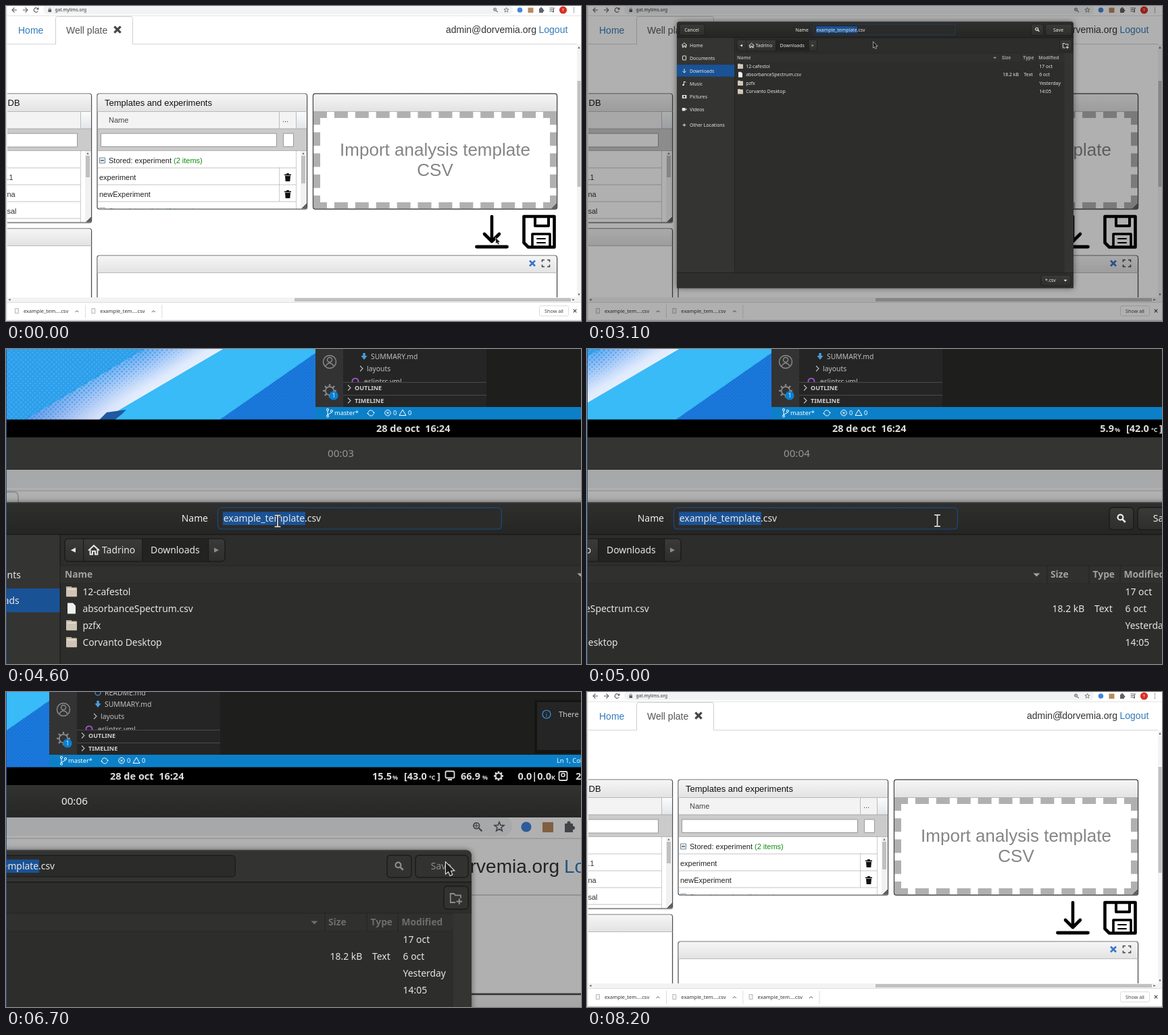
An HTML page with a canvas that plays this animation: 851 px wide and 467 px high, repeating every 8.3 s.

```html
<!DOCTYPE html>
<html lang="en">
<head>
<meta charset="utf-8">
<title>Saving a template</title>
<style>
html, body { margin: 0; width: 100%; height: 100%; overflow: hidden; background: #fff; }
canvas { display: block; }
</style>
</head>
<body>
<canvas id="stage" width="851" height="467"></canvas>
<script>
const ctx = document.getElementById('stage').getContext('2d');
const W = 851, H = 467, LOOP = 8300;
const OPEN = 1200, ZOOM_IN = 3200, BACKDROP = 6600, CLOSE = 6800, SAVED = 7000, ZOOM_OUT = 7700;
const SANS = '"Liberation Sans", Arial, sans-serif', UI = '"Noto Sans", sans-serif';
// time, x, y of the pointer in screen space
const POINTER = [[0, 725, 344], [1000, 725, 344], [1600, 571, 221], [2700, 430, 60], [3900, 405.5, 35],
  [4600, 379.5, 37], [5400, 681, 36.5], [6000, 701, 32.5], [6700, 701, 32.5], [8200, 701, 34], [LOOP, 701, 34]];

function rect(x, y, w, h, color) { ctx.fillStyle = color; ctx.fillRect(x, y, w, h); }
function box(x, y, w, h, r, fill, stroke, lw = 1) {
  ctx.beginPath(); ctx.roundRect(x, y, w, h, r);
  if (fill) { ctx.fillStyle = fill; ctx.fill(); }
  if (stroke) { ctx.strokeStyle = stroke; ctx.lineWidth = lw; ctx.stroke(); }
}
function poly(points, fill) {
  ctx.beginPath(); points.forEach(([x, y]) => ctx.lineTo(x, y));
  ctx.fillStyle = fill; ctx.fill();
}
function line(color, lw, ...points) {
  ctx.beginPath(); points.forEach(([x, y], i) => i ? ctx.lineTo(x, y) : ctx.moveTo(x, y));
  ctx.strokeStyle = color; ctx.lineWidth = lw; ctx.stroke();
}
function dot(x, y, r, fill, stroke, lw = 1) {
  ctx.beginPath(); ctx.arc(x, y, r, 0, 7);
  if (fill) { ctx.fillStyle = fill; ctx.fill(); }
  if (stroke) { ctx.strokeStyle = stroke; ctx.lineWidth = lw; ctx.stroke(); }
}
function text(s, x, y, size, color, font = SANS, align = 'left', weight = '') {
  ctx.font = `${weight} ${size}px ${font}`; ctx.textAlign = align;
  ctx.fillStyle = color; ctx.fillText(s, x, y);
}
function gradient(x0, y0, x1, y1, ...stops) {
  const g = ctx.createLinearGradient(x0, y0, x1, y1);
  stops.forEach((color, i) => g.addColorStop(i / (stops.length - 1), color));
  return g;
}
function shade(y0, y1, a, b) { return gradient(0, y0, 0, y1, a, b); }
function clipped(x, y, w, h, draw) {
  ctx.save(); ctx.beginPath(); ctx.rect(x, y, w, h); ctx.clip(); draw(); ctx.restore();
}
function cross(x, y, r, color, lw) {
  line(color, lw, [x - r, y - r], [x + r, y + r]); line(color, lw, [x - r, y + r], [x + r, y - r]);
}
function caret(x, y, dx, dy, color) {
  poly([[x + dx, y + dy], [x - dx - dy, y - dy - dx], [x - dx + dy, y - dy + dx]], color);
}
function magnifier(x, y, r, color, lw) {
  dot(x - r * .3, y - r * .3, r * .75, null, color, lw);
  line(color, lw * 1.2, [x + r * .3, y + r * .3], [x + r * 1.1, y + r * 1.1]);
}
function gear(x, y, r, color, lw) {
  dot(x, y, r * .62, null, color, lw);
  for (let i = 0; i < 8; i++) {
    const c = Math.cos(i * Math.PI / 4), s = Math.sin(i * Math.PI / 4);
    line(color, lw * 1.3, [x + c * r * .65, y + s * r * .65], [x + c * r, y + s * r]);
  }
}
function house(x, y, color) {
  line(color, 1, [x - 4, y + .3], [x, y - 3.4], [x + 4, y + .3]);
  line(color, 1, [x - 2.7, y - .6], [x - 2.7, y + 3.2], [x - 1, y + 3.2], [x - 1, y + .8],
    [x + 1, y + .8], [x + 1, y + 3.2], [x + 2.7, y + 3.2], [x + 2.7, y - .6]);
}

function pointerAt(t) {
  const i = POINTER.findIndex(k => k[0] > t), [a, b] = [POINTER[i - 1], POINTER[i]];
  const u = (t - a[0]) / (b[0] - a[0]), e = u * u * (3 - 2 * u);
  return [a[1] + (b[1] - a[1]) * e, a[2] + (b[2] - a[2]) * e];
}

function toolbar() {
  rect(0, -1, W, 16, '#fff');
  box(55, -2, 695, 14.5, 7, '#f1f3f4');
  const c = '#5f6368';
  line(c, 1.1, [16, 6], [9, 6]); line(c, 1.1, [12.5, 2.5], [9, 6], [12.5, 9.5]);
  line(c, 1.1, [25, 6], [32, 6]); line(c, 1.1, [28.5, 2.5], [32, 6], [28.5, 9.5]);
  ctx.beginPath(); ctx.arc(44.5, 6, 3.2, .5, 5.6); ctx.strokeStyle = c; ctx.lineWidth = 1.1; ctx.stroke();
  poly([[48.5, 1.8], [48.5, 5.5], [44.8, 5.5]], c);
  rect(62.5, 5, 4.6, 4, c); dot(64.8, 4.6, 1.5, null, c, .8);
  text('gat.mylims.org', 72.5, 8.4, 6.6, '#333', UI);
  magnifier(724.5, 6, 2.9, c, .9);
  line(c, .6, [722, 5.1], [725, 5.1]); line(c, .6, [723.6, 3.6], [723.6, 6.6]);
  ctx.beginPath();
  for (let i = 0; i < 10; i++) {
    const r = i % 2 ? 1.6 : 3.7, a = i * Math.PI / 5 - Math.PI / 2;
    ctx.lineTo(740.5 + r * Math.cos(a), 6 + r * Math.sin(a));
  }
  ctx.closePath(); ctx.strokeStyle = c; ctx.lineWidth = .8; ctx.stroke();
  dot(760.5, 6, 3.8, '#4285e0');
  rect(772.5, 2.5, 8, 7.5, '#b98b5c');
  rect(789, 3.5, 6, 6.5, c); dot(792, 3, 1.3, c); dot(795.2, 6.7, 1.3, c);
  for (let i = 0; i < 3; i++) {
    line(c, 1, [804.5, 3 + i * 2.4], [i < 2 ? 810 : 808, 3 + i * 2.4]);
    dot(840.5, 3 + i * 3, .8, c);
  }
  line(c, .9, [810.5, 8], [810.5, 3], [812.5, 3]); dot(809.7, 8.3, 1.2, c);
  dot(824.5, 6, 5.6, '#d93025'); text('T', 824.5, 8.2, 6, '#fff', UI, 'center');
  rect(0, 14.2, W, .8, '#dcdcdc');
}

function panel(x, y, w, h, head) {
  box(x + 1, y + 1.5, w, h, 3, 'rgba(0,0,0,.16)');
  box(x, y, w, h, 3, '#fff', '#4c4c4c', 1.2);
  box(x + .6, y + .6, w - 1.2, head, [3, 3, 0, 0], shade(y, y + head, '#f6f6f6', '#e3e3e3'));
  rect(x, y + head, w, 1, '#b9b9b9');
}
function grip(x, y) {
  poly([[x, y], [x - 8, y], [x, y - 8]], '#777');
  line('#333', 1, [x - 7, y], [x, y - 7]); line('#333', 1, [x - 4, y], [x, y - 4]);
}
function grid(left, right, edge, bottom) {
  rect(left, 157, right - left, 25, '#f3f3f3');
  rect(edge, 157, right - edge, 25, shade(157, 182, '#fbfbfb', '#e2e6ea'));
  rect(left, 182, right - left, 33, '#cbcbcb');
  rect(left, 181.5, right - left, 1, '#aaa'); rect(left, 214, right - left, 1, '#b5b5b5');
  rect(edge, 157, 1, 25, '#bbb');
  for (let y = 240; y < bottom; y += 25) rect(left, y - .5, edge - left, 1, '#c4c4c4');
  ctx.setLineDash([1, 1]); line('#999', 1, [edge + .5, 215], [edge + .5, bottom]); ctx.setLineDash([]);
  rect(right - 9, 215, 8, bottom - 215, '#f1f1f1');
  rect(right - 8, 222, 6, right > 200 ? 41 : 32, '#c1c1c1');
  caret(right - 5, 218.5, 0, -1.5, '#666');
}
function input(x, y, w, h) { box(x, y, w, h, 0, '#fff', '#999'); }
function trash(x, y) {
  rect(x - 5, y - 4.5, 10, 1.6, '#111'); rect(x - 1.8, y - 6, 3.6, 2, '#111');
  poly([[x - 4, y - 2.2], [x + 4, y - 2.2], [x + 3.3, y + 6], [x - 3.3, y + 6]], '#111');
}
function groupRow(label, count, y) {
  box(138.5, y - 8, 8, 8, 0, '#eaf2f8', '#6d8aa0'); rect(140, y - 4.6, 5, 1.2, '#333');
  text(label, 152, y, 11, '#222');
  text(count, 152 + ctx.measureText(label + ' ').width, y, 11, '#0d8a0d');
}
function dropZone() {
  const x = 455, y = 156, w = 360, h = 145, gray = '#b0b0b0';
  for (let i = 0; i < 12; i++) {
    const dx = x + i * (w - 20) / 11;
    rect(dx, y, 20, 10, gray); rect(dx, y + h - 10, 20, 10, gray);
  }
  for (let i = 0; i < 5; i++) {
    const dy = y + i * (h - 20) / 4;
    rect(x, dy, 10, 20, gray); rect(x + w - 10, dy, 10, 20, gray);
  }
  text('Import analysis template', 635, 222, 26, '#858585', SANS, 'center');
  text('CSV', 635, 252, 26, '#858585', SANS, 'center');
}
function actionIcons() {
  ctx.lineCap = ctx.lineJoin = 'round';
  line('#000', 4.6, [719, 312], [719, 348]); line('#000', 4.6, [708, 338], [719, 349], [730, 338]);
  line('#000', 4.8, [696.5, 357], [741.5, 357]);
  line('#000', 4.6, [766.5, 312], [811.5, 312], [811.5, 357.5], [773, 357.5], [766.5, 351], [766.5, 312]);
  line('#000', 4, [783, 313], [783, 326], [803, 326], [803, 313]);
  line('#000', 3.6, [779, 356], [779, 338], [805, 338], [805, 356]);
  line('#000', 2, [786, 345], [798, 345]); line('#000', 2, [786, 351], [798, 351]);
  ctx.lineCap = 'butt'; ctx.lineJoin = 'miter';
}

function page() {
  rect(0, 15, W, 424, '#fff');
  rect(2, 56, 843, 1, '#d5d5d5');
  box(73.5, 15.5, 114, 44, 3, '#fff', '#cfcfcf'); rect(72, 57, 118, 4, '#fff');
  text('Home', 18, 41, 14, '#337ab7');
  text('Well plate', 89, 41, 14, '#555'); cross(165, 35, 4.6, '#444', 3.2);
  text('admin@dorvemia.org', 785, 40, 14, '#333', SANS, 'right');
  text('Logout', 788.5, 40, 14, '#337ab7');
  clipped(2, 57, 843, 375, () => {
    panel(-8, 130, 134.5, 191, 26);
    text('DB', 2.5, 148, 13, '#111');
    grid(-7, 126, 110, 320); input(-6, 189, 111.5, 20);
    ['.1', 'na', 'sal'].forEach((s, i) => text(s, 1.5, 258 + i * 25, 11, '#333'));
    grip(126, 320.5);

    panel(135, 130, 310.5, 171, 26);
    text('Templates and experiments', 146, 148, 13, '#111');
    grid(136, 445, 429, 300);
    rect(404, 157, 1, 25, '#bbb');
    ctx.setLineDash([1, 1]); line('#999', 1, [404.5, 240], [404.5, 290]); ctx.setLineDash([]);
    text('Name', 152, 172.5, 11, '#444'); text('...', 409, 172, 11, '#444');
    input(140.5, 189, 260, 19.5); input(410.5, 189, 15, 19.5);
    groupRow('Stored: experiment', '(2 items)', 233);
    text('experiment', 138, 258, 11, '#222'); trash(417, 254);
    text('newExperiment', 138, 283, 11, '#222'); trash(417, 279);
    clipped(136, 290, 293, 10.4, () => groupRow('Stored: template', '(2 items)', 307.5));
    grip(445, 300.5);

    panel(454.5, 130, 361, 171, 26);
    dropZone(); grip(815, 300.5);
    box(454.5, 130, 361, 171, 3, null, '#4c4c4c', 1.2);
    actionIcons();

    panel(-8, 330, 134.5, 120, 25);
    panel(135, 370, 680.5, 90, 25);
    cross(779, 381.5, 4, '#3a76cc', 2.6);
    for (const [sx, sy] of [[-1, -1], [1, -1], [1, 1], [-1, 1]])
      line('#444', 1.6, [799 + sx * 2, 381.5 + sy * 5], [799 + sx * 5.5, 381.5 + sy * 5], [799 + sx * 5.5, 381.5 + sy * 2]);
  });
  rect(845, 57, 6, 375, '#f3f3f3'); rect(845.5, 111, 5, 157, '#c1c1c1');
  caret(848, 61.5, 0, -1.5, '#555'); caret(848, 428, 0, 1.5, '#555');
  rect(2, 432, 849, 7, '#f3f3f3'); rect(427, 433, 409, 5, '#c1c1c1');
  caret(5, 435.5, -1.5, 0, '#555'); caret(840, 435.5, 1.5, 0, '#555');
}

function shelf(files) {
  rect(0, 439, W, 28, '#fff'); rect(0, 439, W, 1, '#ddd'); rect(0, 465.5, W, 1.5, '#d2d2d2');
  for (let i = 0; i < files; i++) {
    const x = i * 113.3;
    box(x + 13.5, 448.5, 5, 7, 0, '#f4f4f4', '#aaa', .8);
    text('example_tem….csv', x + 26, 455.3, 7.5, '#333', UI);
    line('#555', 1, [x + 102.5, 454], [x + 105, 451.5], [x + 107.5, 454]);
    rect(x + 117, 443, 1, 20, '#ddd');
  }
  box(789.5, 444.5, 43, 15, 2, '#fff', '#ddd');
  text('Show all', 811, 454.5, 7.2, '#444', UI, 'center');
  cross(842, 452, 2.3, '#444', 1.1);
}

function dialog(focused) {
  const ink = focused ? '#eeeeec' : '#8e8e8b', soft = '#e6e6e3', head = focused ? '#a2a29f' : '#6d6d6a';
  const edge = '#1b1b1b', size = 6.95;
  const label = (s, x, y, color = soft, align) => text(s, x, y + 2.6, size, color, UI, align);
  const button = (x, y, w, h) => box(x, y, w, h, 2.5, focused ? shade(y, y + h, '#3a3a38', '#2e2e2d') : '#323231', edge, .7);

  ctx.shadowColor = 'rgba(0,0,0,.5)'; ctx.shadowBlur = 9;
  box(133, 23.2, 587, 395, [4, 4, 1, 1], '#2d2d2b');
  ctx.shadowBlur = 0; ctx.shadowColor = 'transparent';
  box(133, 23.2, 587, 24, [4, 4, 0, 0], focused ? shade(23, 47, '#2f2f2e', '#252524') : '#333332');
  rect(136, 23.2, 581, .5, '#484846'); rect(133, 46.5, 587, .8, edge);
  button(137, 27, 37, 16.5); label('Cancel', 155, 35, ink, 'center');
  label('Name', 308.4, 35, ink);
  box(335.2, 27.2, 210, 15.8, 2.5, '#2b2b2a', focused ? '#1b4a80' : edge, .6);
  rect(339, 30.2, 61, 9.8, '#1a5296');
  label('example_template.csv', 339.4, 35);
  button(657.5, 27, 18, 16.5); magnifier(666.5, 35, 2.6, ink, 1.1);
  button(678.5, 27, 39, 16.5); label('Save', 697.5, 35, ink, 'center');

  rect(133, 47.3, 85.5, 348, '#343432'); rect(218.3, 47.3, .6, 348, edge);
  rect(133, 87, 85.3, 17.7, '#1a5296');
  ['Home', 'Documents', 'Downloads', 'Music', 'Pictures', 'Videos'].forEach((s, i) => {
    const y = 58 + i * 19; label(s, 152, y);
    if (i === 0) house(144, y, soft);
    else if (i === 1) box(141.5, y - 3, 5, 6, .5, null, soft, 1);
    else if (i === 2) { line(soft, 1, [144, y - 3], [144, y + 3]); line(soft, 1, [141.5, y + .5], [144, y + 3], [146.5, y + .5]); }
    else if (i === 3) { dot(142.5, y + 2, 1.3, soft); line(soft, 1, [143.4, y + 2], [143.4, y - 3], [146.5, y - 2]); }
    else if (i === 4) { rect(140.8, y - 2, 6.5, 5, soft); dot(144, y + .5, 1.4, '#343432'); }
    else { rect(140.8, y - 2, 4.6, 4.5, soft); caret(146, y + .2, -1.4, 0, soft); }
  });
  label('Other Locations', 152, 176.5);
  line(soft, .9, [141.5, 176.5], [146.5, 176.5]); line(soft, .9, [144, 174], [144, 179]);

  button(222, 50.2, 118.5, 16.8);
  rect(279, 50.6, 49, 16, '#232322');
  [235.5, 279, 328].forEach(x => rect(x, 50.2, .6, 16.8, edge));
  caret(228.2, 58.6, -1.8, 0, soft); caret(334.3, 58.6, 1.8, 0, '#8b8b88');
  house(243.5, 58.6, soft);
  label('Tadrino', 249.5, 58.6); label('Downloads', 285.5, 58.6);
  button(699.5, 50, 18, 17);
  line(ink, .9, [708, 62], [704.4, 62], [704.4, 55.5], [707, 55.5], [708, 56.7], [712, 56.7], [712, 58.7]);
  line(ink, 1, [708.8, 61.3], [713, 61.3]); line(ink, 1, [710.9, 59.2], [710.9, 63.4]);

  rect(218.7, 70, 488, 13, '#30302e'); rect(218.7, 83, 488, .5, '#292927'); rect(218.7, 69.7, 501, .5, '#252523');
  [['Name', 222], ['Size', 614], ['Type', 645.3], ['Modified', 668.2]].forEach(([s, x]) =>
    text(s, x, 79.2, 6.9, head, UI, 'left', '600'));
  [611.3, 642.3, 665.3].forEach(x => rect(x, 70, .5, 13, '#232321'));
  poly([[601.2, 75.8], [606.2, 75.8], [603.7, 78.3]], head);
  rect(706.5, 70, 13.5, 325, '#343432');
  const rows = [['12-cafestol', '17 oct'], ['absorbanceSpectrum.csv', '6 oct'], ['pzfx', 'Yesterday'], ['Corvanto Desktop', '14:05']];
  rows.forEach(([name, date], i) => {
    const y = 89.3 + i * 12.5;
    if (i === 1) { poly([[224, y - 4], [228, y - 4], [230, y - 2], [230, y + 4], [224, y + 4]], '#f0f0ee'); }
    else { rect(223, y - 3.8, 4, 2, '#b5a894'); box(223, y - 3, 8, 6.8, .5, '#cfc5b6'); rect(224, y - 2, 6, .7, '#e9e1d5'); }
    label(name, 235.2, y); label(date, 669.3, y);
  });
  label('18.2 kB', 615.3, 101.8); label('Text', 646.5, 101.8);
  rect(133, 395, 587, .8, edge); rect(133, 395.8, 587, 22.4, '#2f2f2d');
  button(672, 399, 44, 16); label('*.csv', 678, 406.8); poly([[705.5, 405.7], [710.5, 405.7], [708, 408.5]], soft);
}

function halftone(color, x0, x1, y0, y1, step, radiusAt) {
  ctx.fillStyle = color;
  ctx.beginPath();
  for (let y = y0, k = 0; y < y1; y += step / 2, k++)
    for (let x = x0 + (k % 2) * step / 2; x < x1; x += step) {
      const r = radiusAt(x, y);
      if (r > .3) { ctx.moveTo(x + r, y); ctx.arc(x, y, r, 0, 7); }
    }
  ctx.fill();
}

function wallpaper() {
  clipped(0, -200, 815, 124, () => {
    rect(0, -200, 815, 124, '#2c9feb');
    // light beam running up to the right, blue on its left side and white on its right
    const beam = (x, y) => (x - 385 + (y + 77) * 1.7) / 115;
    poly([[385, -76], [500, -76], [711, -200], [594, -200]],
      gradient(460, -140, 512, -54, '#3aa4ee', '#8fbdf5', '#dfeafd', '#f6f9ff'));
    poly([[385, -76], [500, -76], [711, -200], [594, -200]],
      gradient(385, -77, 560, -170, 'rgba(110,140,225,.55)', 'rgba(255,255,255,0)'));
    halftone('rgba(36,140,232,.55)', 385, 711, -200, -76, 7, (x, y) => {
      const u = beam(x, y);
      return u < 0 || u > .8 ? 0 : 2.4 * (.8 - u);
    });
    halftone('rgba(110,190,248,.4)', 337, 594, -200, -76, 7, (x, y) => beam(x, y) < 0 ? 1.3 : 0);
    poly([[500, -76], [674, -76], [851, -200], [711, -200]], '#38bbf7');
    poly([[673, -76], [815, -76], [815, -175]], '#1b79dc');
    halftone('rgba(10,80,180,.22)', 674, 816, -176, -76, 5, (x, y) => x > 674 - (y + 77) / .7 ? 1.1 : 0);
    poly([[495, -76], [506, -87], [535, -91], [528, -84], [518, -76]], '#1d5aa0');
  });
}

function editor() {
  const c = '#c0c0c0';
  rect(815, -200, 1000, 124, '#1e1e1d'); rect(815, -200, 41, 124, '#333333'); rect(856, -200, 212, 124, '#252526');
  dot(836, -162, 9.5, null, '#8a8a8a', 1.5); dot(836, -165, 3.5, null, '#8a8a8a', 1.5);
  ctx.beginPath(); ctx.arc(836, -154, 6, 3.4, 6); ctx.stroke();
  gear(836, -119, 10, '#8a8a8a', 1.7); dot(842, -112, 6.6, '#0a7fd0'); text('1', 842, -109, 8, '#fff', UI, 'center');
  dot(887, -187, 4, null, '#4a9fd8', 1.2); text('README.md', 897, -183, 10.4, c, UI);
  rect(885.3, -175, 3.4, 5, '#4a9fd8'); poly([[882.5, -171], [891.5, -171], [887, -165]], '#4a9fd8');
  text('SUMMARY.md', 897, -166.2, 10.4, c, UI);
  line(c, 1.1, [881, -156], [885, -152], [881, -148]); text('layouts', 891, -148.3, 10.4, c, UI);
  clipped(856, -145, 212, 13, () => {
    dot(874, -133, 4.5, null, '#9a55c4', 2); text('.eslintrc.yml', 884, -129.5, 10.4, c, UI);
  });
  [['OUTLINE', -123.5], ['TIMELINE', -104.5]].forEach(([s, y]) => {
    rect(856, y - 8.5, 212, 1, '#4a4a4a');
    line(c, 1.1, [863, y - 4], [867, y], [863, y + 4]);
    text(s, 873, y + 3.4, 9, '#d0d0d0', UI, 'left', 'bold');
  });
  box(1533, -176, 300, 79, 2, 'rgba(0,0,0,.3)'); rect(1537, -173, 300, 71, '#252526');
  dot(1551, -155, 6, null, '#3794dd', 1.2); text('i', 1551, -151.5, 9, '#3794dd', UI, 'center');
  text('There is an update ready.', 1569, -151, 11, '#ccc', UI);

  rect(815, -95, 1000, 19, '#0b80c8');
  const w = '#fff';
  line(w, 1, [833, -90], [833, -82]); dot(833, -91, 1.6, null, w); dot(833, -81.5, 1.6, null, w); dot(839, -89, 1.6, null, w);
  line(w, 1, [839, -87], [833, -83.5]);
  text('master*', 843, -82.7, 9.3, w, UI);
  ctx.beginPath(); ctx.arc(897, -86, 4, .4, 2.9); ctx.stroke(); ctx.beginPath(); ctx.arc(897, -86, 4, 3.5, 6); ctx.stroke();
  caret(901.5, -86, 0, 1.3, w); caret(892.5, -86, 0, -1.3, w);
  dot(922, -86.3, 4.3, null, w); cross(922, -86.3, 1.8, w, 1);
  text('0', 930, -82.7, 9.3, w, UI);
  line(w, 1, [939, -82.5], [944, -91], [949, -82.5], [939, -82.5]); text('0', 952, -82.7, 9.3, w, UI);
  text('Ln 1, Col 1', 1566, -82.7, 9.3, w, UI);
}

function desktop(t) {
  const late = t >= 6000, c = '#dcdcda';
  const bold = (s, x, size = 14.5, align = 'left') => text(s, x, -58, size, c, UI, align, 'bold');
  wallpaper(); editor();
  rect(0, -76.5, 2000, 26.5, '#000');
  bold('28 de oct  16:24', 905);
  bold(late ? '15.5' : '5.9', 1322, 14.5, 'right'); bold('%', 1323, 9);
  bold(late ? '[43.0' : '[42.0', 1340); bold('°C', 1377, 9); bold(']', 1389);
  box(1401.5, -70.5, 13, 10, 2, null, c, 1.8); rect(1405, -59, 6, 2, c);
  bold(late ? '66.9' : '67.0', 1424); bold('%', 1456, 9);
  gear(1480, -63.5, 7, c, 2);
  bold('0.0|0.0', 1508.5); bold('K', 1558, 9);
  box(1569.5, -70, 12, 13, 2, null, c, 1.8); dot(1575.5, -65, 2.5, null, c, 1.6);
  bold('2.1', 1594);
  const active = t >= BACKDROP;
  rect(0, -50, 2000, 47, active ? shade(-50, -3, '#323231', '#272726') : '#343433');
  rect(0, -3, 2000, 1, '#2a2a29');
  text('00:0' + Math.floor((t - 650) / 1000), 833, -20.6, 15.2, active ? '#f2f2f0' : '#959592', UI);
}

function cursor(x, y, t) {
  const open = t >= OPEN && t < CLOSE;
  const beam = open ? x > 336 && x < 545 && y > 27 && y < 43 : x > 652 && x < 785 && y > 27 && y < 43;
  ctx.save(); ctx.translate(x, y);
  if (beam) {
    for (const [color, lw] of [['#222', 2], ['#ddd', .9]]) {
      line(color, lw, [0, -4], [0, 4]);
      line(color, lw, [-2.2, -4.2], [2.2, -4.2]); line(color, lw, [-2.2, 4.2], [2.2, 4.2]);
    }
  } else {
    const shape = [[0, 0], [0, 8], [1.9, 6.4], [3.2, 9.4], [4.6, 8.8], [3.4, 5.9], [5.8, 5.7]];
    line('#e4e4e4', 1.1, ...shape, [0, 0], [0, 1]); poly(shape, '#1c1c1c');
  }
  ctx.restore();
}

function draw(t) {
  const [mx, my] = pointerAt(t), zoomed = t >= ZOOM_IN && t < ZOOM_OUT;
  ctx.setTransform(1, 0, 0, 1, 0, 0);
  rect(0, 0, W, H, '#fff');
  if (zoomed) {
    // the magnified view trails the pointer proportionally
    ctx.translate(Math.round(107.7 - 1.225 * mx), Math.round(184 - 1.6 * (my - 35)));
    desktop(t);
    ctx.scale(2, 2);
  }
  clipped(0, -1, W, H + 1, () => {
    page(); toolbar(); shelf(t >= SAVED ? 3 : 2);
    rect(0, 0, 1.5, H, '#d9d9d9');
    if (t >= OPEN && t < CLOSE) {
      rect(0, -1, W, H + 1, 'rgba(0,0,0,.31)');
      dialog(t < BACKDROP);
    }
  });
  cursor(mx, my, t);
  if (zoomed) {
    ctx.setTransform(1, 0, 0, 1, 0, 0);
    rect(0, 0, 1, H, '#24548f');
  }
}

function tick() {
  draw(Math.floor(performance.now() % LOOP / 100) * 100);
  requestAnimationFrame(tick);
}
tick();
</script>
</body>
</html>
```
